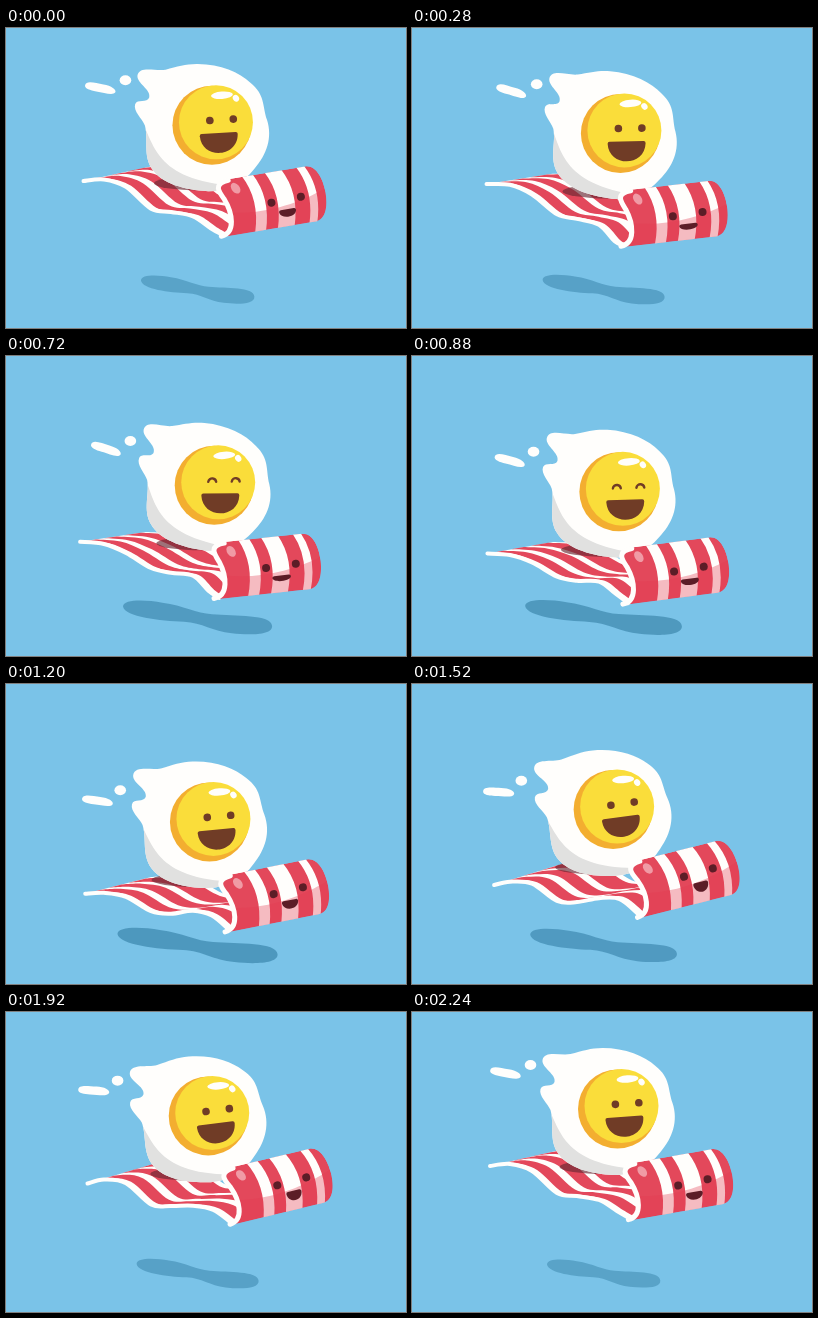
These frames come from a looping animation (400x300 px, 2280 ms). An HTML page with a canvas:

```html
<!DOCTYPE html>
<html lang="en">
<head>
<meta charset="utf-8">
<title>Egg riding a bacon carpet</title>
<style>
html, body { margin: 0; width: 100%; height: 100%; overflow: hidden; background: #7ac3e8; }
canvas { display: block; }
</style>
</head>
<body>
<canvas id="stage" width="400" height="300"></canvas>
<script>
const ctx = document.getElementById('stage').getContext('2d');
const LOOP = 2280, STEP = 40, TAU = Math.PI * 2, DEG = Math.PI / 180;
const SKY = '#7ac3e8', WHITE = '#fffefc', RED = '#e3485b', DARK = '#5c1d27', BROWN = '#703c26';

const shapes = {
  shadow: new Path2D('M-80-12C-80-20-55-19-38-16C-15-13-2-5 15-4C40-2 78-4 79 8C80 18 55 18 36 16C15 14 5 5-15 4C-40 3-78-1-80-12Z'),
  egg: new Path2D('M-78-46C-76-56-60-50-50-52C-38-55-30-58-18-58C5-58 24-50 35-40C50-28 47-18 52-3C58 15 52 32 40 46C28 62 12 69-6 69C-30 68-52 62-62 48C-72 34-66 18-70 4C-73-3-82-10-80-17C-78-23-68-18-66-24C-64-32-79-38-78-46Z'),
  eggShade: new Path2D('M-76-4C-60 18-64 56 14 63L30 80L-90 80Z'),
  drop: new Path2D('M-16 0C-16-6-6-4 2-4C10-4 16-1 15 2C13 6 4 4-4 4C-10 4-16 3-16 0Z'),
  roll: new Path2D('M-42-29L36-29C47-29 52-14 52 0C52 14 48 27 37 27L-58 27C-43 25-43 5-49-10C-53-18-58-28-42-29Z'),
  rollEdge: new Path2D('M-42-28C-58-27-53-18-49-10C-43 5-43 25-58 26'),
  rollShade: new Path2D('M-60 30L-46 4C-10 12 25 6 52-4L56 32Z')
};

let sin, cos;
// One harmonic around a mean value
const wave = (mean, c, s) => mean + c * cos + s * sin;

function fill(shape, color) {
  ctx.fillStyle = color;
  ctx.fill(shape);
}

function oval(x, y, rx, ry, color, angle = 0) {
  ctx.fillStyle = color;
  ctx.beginPath();
  ctx.ellipse(x, y, rx, ry, angle, 0, TAU);
  ctx.fill();
}

function at(x, y, degrees, draw) {
  ctx.save();
  ctx.translate(x, y);
  ctx.rotate(degrees * DEG);
  draw();
  ctx.restore();
}

// Smooth curve through points, continuing the current path
function curve(pts) {
  ctx.lineTo(...pts[0]);
  for (let i = 0; i < pts.length - 1; i++) {
    const a = pts[i - 1] || pts[i], b = pts[i], c = pts[i + 1], d = pts[i + 2] || c;
    ctx.bezierCurveTo(b[0] + (c[0] - a[0]) / 6, b[1] + (c[1] - a[1]) / 6,
      c[0] - (d[0] - b[0]) / 6, c[1] - (d[1] - b[1]) / 6, c[0], c[1]);
  }
}

function smile(x, y, half, depth, color) {
  ctx.fillStyle = color;
  ctx.beginPath();
  ctx.moveTo(x - half + 2, y);
  ctx.lineTo(x + half - 2, y);
  ctx.quadraticCurveTo(x + half, y, x + half, y + 2);
  ctx.bezierCurveTo(x + half - 1, y + depth * 1.3, x - half + 1, y + depth * 1.3, x - half, y + 2);
  ctx.quadraticCurveTo(x - half, y, x - half + 2, y);
  ctx.fill();
}

function drawShadow() {
  const size = wave(69, -12, 0) / 80;
  at(192, 262, 0, () => {
    ctx.scale(size, 0.3 + 0.7 * size);
    ctx.globalAlpha = wave(0.5, -0.07, 0);
    fill(shapes.shadow, '#2d789f');
  });
}

function drawStrip() {
  const front = [
    [wave(78, 0, -4.5), wave(181, -27, -10)],
    [98, wave(180, -28, -7)],
    [120, wave(186, -27, -3)],
    [145, wave(204, -23, -4)],
    [165, wave(207, -23, -2)],
    [187, wave(208, -20, 2)],
    [wave(205, 0, -3), wave(217, -18, 10)],
    [wave(219, -2, -8), wave(227, -21, 5)]
  ];
  const across = k => front.map(([x, y], i) =>
    [x + k * (66 + 3 * i), y + k * (-15 + 6 * sin)]);
  const band = (from, to, color) => {
    ctx.fillStyle = color;
    ctx.beginPath();
    curve(across(from));
    curve(across(to).reverse());
    ctx.fill();
  };
  band(0, 1, WHITE);
  [[.07, .24], [.36, .55], [.66, .92]].forEach(([a, b]) => band(a, b, RED));
  ctx.strokeStyle = WHITE;
  ctx.lineWidth = 4;
  ctx.lineCap = 'round';
  ctx.beginPath();
  curve(front);
  ctx.stroke();
}

function drawDrops() {
  at(wave(94, 0, 7.5), wave(88, -27, -10), 8 + 8 * sin, () => fill(shapes.drop, WHITE));
  oval(wave(117.5, 1, 8.5), wave(79, -26, -8), 5.8, 5, WHITE);
}

function drawEgg(closed) {
  const x = wave(208, 0.5, 4), y = wave(115, -21, 1);
  oval(x - 15, y + 61, 46, 7, 'rgba(105,40,52,.65)');
  at(x, y, 6 * sin, () => {
    fill(shapes.egg, WHITE);
    ctx.clip(shapes.egg);
    fill(shapes.eggShade, '#e1e1e0');
  });
  oval(x - 3, y + 3, 39.5, 39.5, '#f3ae30');
  oval(x + 1, y, 37, 37, '#fadd3a');
  at(x, y, 0, () => {
    oval(7, -27, 11, 3.7, WHITE, -0.08);
    oval(21, -24, 3, 3.5, WHITE, -0.6);
  });
  at(x, y, -4 + 4 * sin, () => {
    if (closed) {
      ctx.strokeStyle = BROWN;
      ctx.lineWidth = 2.4;
      for (const ex of [-5, 18.5]) {
        ctx.beginPath();
        ctx.arc(ex, 0, 4, Math.PI * 1.05, Math.PI * 1.95);
        ctx.stroke();
      }
    } else {
      oval(-5, -2, 3.8, 3.8, BROWN);
      oval(18.5, -2, 3.8, 3.8, BROWN);
    }
    smile(3, 11, 19, 20, BROWN);
  });
}

function rollBand(left, right) {
  ctx.fillStyle = WHITE;
  ctx.beginPath();
  ctx.moveTo(left, -30);
  ctx.quadraticCurveTo(left + 14, -4, left + 4, 28);
  ctx.lineTo(right + 4, 28);
  ctx.quadraticCurveTo(right + 14, -4, right, -30);
  ctx.fill();
}

function drawRoll() {
  at(wave(269, 0, -7), wave(193, -21, 8), -10 + 4.5 * sin, () => {
    ctx.save();
    ctx.clip(shapes.roll);
    fill(shapes.roll, RED);
    rollBand(-28, -17);
    rollBand(-5, 12);
    rollBand(27, 35);
    fill(shapes.rollShade, 'rgba(226,58,80,.34)');
    oval(-36, -19, 4, 6, 'rgba(255,255,255,.45)', -0.5);
    ctx.restore();
    ctx.strokeStyle = WHITE;
    ctx.lineWidth = 5;
    ctx.stroke(shapes.rollEdge);
    const lift = wave(0, 1, 2);
    oval(-3, lift, 4, 4, DARK);
    oval(27, lift - 1, 4, 4, DARK);
    smile(11.5, 9 + lift, 8.5 + sin, 7.5 - 2.5 * sin, DARK);
  });
}

function frame(now) {
  const t = Math.floor((now - start) / STEP) * STEP % LOOP;
  const phase = TAU * (t + STEP) / LOOP;
  sin = Math.sin(phase);
  cos = Math.cos(phase);
  ctx.fillStyle = SKY;
  ctx.fillRect(0, 0, 400, 300);
  drawShadow();
  drawStrip();
  drawDrops();
  drawEgg(t >= 440 && t < 1040);
  drawRoll();
  requestAnimationFrame(frame);
}

const start = performance.now();
frame(start);
</script>
</body>
</html>
```
